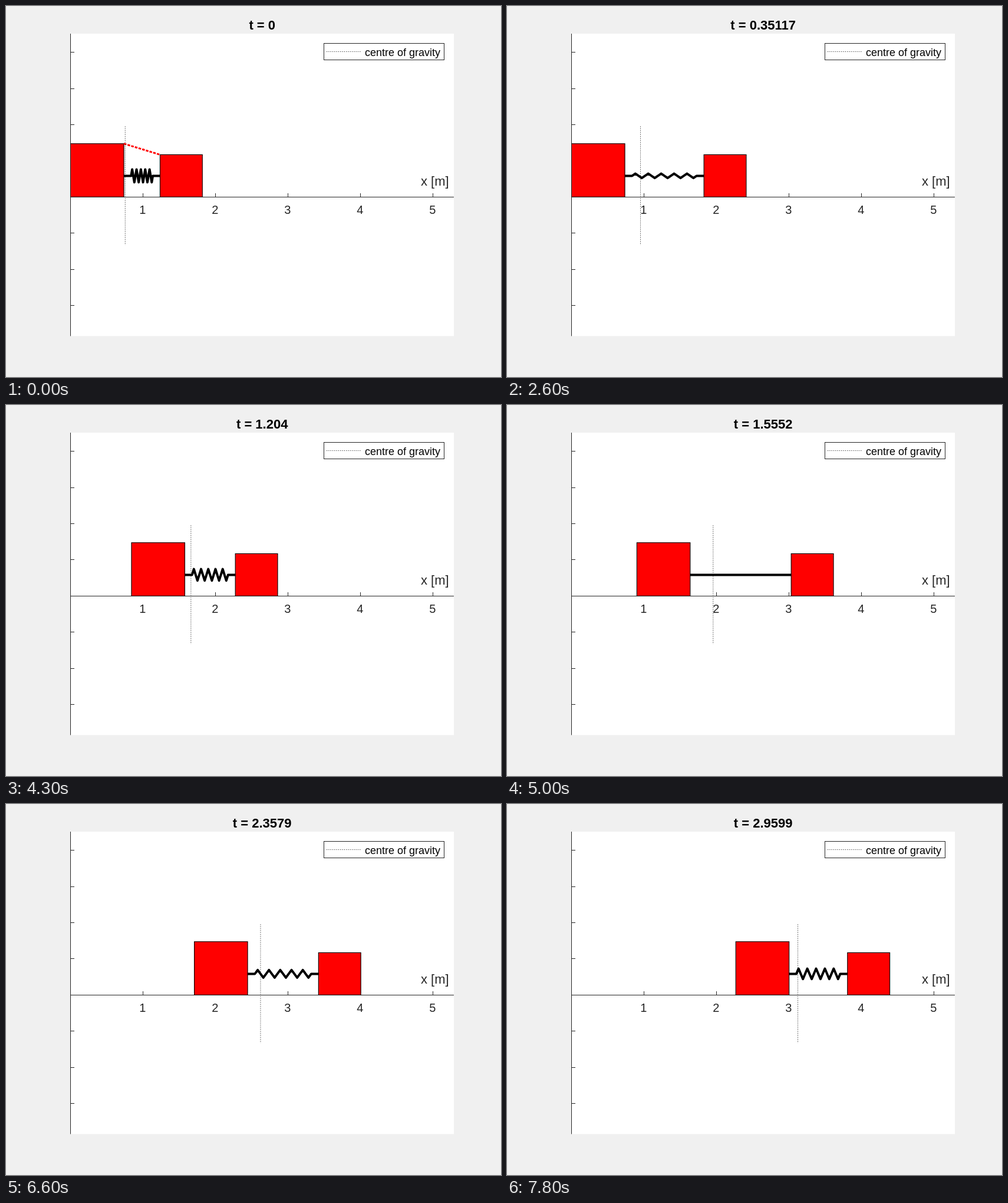
An HTML page for the animation above (7.9 s loop, 840 px wide and 630 px high).

```html
<!DOCTYPE html>
<html lang="en">
<head>
<meta charset="utf-8">
<title>Spring and two blocks</title>
<style>
  html, body { margin: 0; width: 100%; height: 100%; overflow: hidden; background: #f0f0f0; }
  svg { display: block; width: 840px; height: 630px; font-family: "Liberation Sans", Arial, sans-serif; }
  .axis { stroke: #262626; fill: none; }
  .label { fill: #262626; font-size: 20px; text-anchor: middle; }
  .dotted { stroke: #000; stroke-width: .8; stroke-dasharray: 1.3 2; fill: none; }
  .block { fill: #f00; stroke: #000; stroke-width: 1.1; }
</style>
</head>
<body>
<svg viewBox="0 0 840 630">
  <rect width="840" height="630" fill="#f0f0f0"/>
  <rect x="109" y="47" width="651" height="513.5" fill="#fff"/>
  <g id="axes"></g>
  <rect id="big" class="block"/>
  <rect id="small" class="block"/>
  <path id="rope" stroke="#f00" stroke-width="3" stroke-dasharray="4.5 2" fill="none"/>
  <path id="spring" stroke="#000" stroke-width="4" stroke-linejoin="round" fill="none"/>
  <path id="centre" class="dotted"/>
  <path class="axis" d="M109.5 47V560.5M109 324.5H760"/>
  <text x="704" y="305" font-size="22" fill="#262626">x [m]</text>
  <rect x="539.5" y="63.5" width="204" height="28" fill="#fff" stroke="#262626"/>
  <path class="dotted" d="M544 77.5H603"/>
  <text x="609" y="85" font-size="18">centre of gravity</text>
  <text id="title" x="434.7" y="40" font-size="22" font-weight="bold" text-anchor="middle"></text>
</svg>
<script>
const $ = id => document.getElementById(id);
const SCALE = 122.83, LEFT = 109.5, GROUND = 324.3;
const px = x => LEFT + SCALE * x;
const py = y => GROUND - SCALE * y;

// Physical setup: the heavy block starts against a wall, the spring is compressed.
const BIG = Math.cbrt(2 / 5), SMALL = Math.cbrt(1 / 5);
const REST = 1, SQUEEZE = 0.5, STIFFNESS = 25;
const OMEGA_WALL = Math.sqrt(STIFFNESS), OMEGA_FREE = Math.sqrt(STIFFNESS * 1.5);
const RELEASE = Math.PI / 2 / OMEGA_WALL, SPEED = SQUEEZE * OMEGA_WALL;
const COILS = 5, STUB = 0.1, SPRING_Y = SMALL / 2;
const WIRE = Math.hypot((REST - 2 * STUB) / (2 * COILS), 0.05);

const LOOP = 7900, HOLD = 2000, STEP = 100, DT = 15 / 299;

function drawAxes() {
  let ticks = "", labels = "";
  for (let i = 1; i <= 5; i++) {
    const x = Math.round(px(i)) + 0.5;
    ticks += `M${x} 324.5V318`;
    labels += `<text class="label" x="${x - 0.7}" y="353">${i}</text>`;
  }
  for (let i = -3; i <= 4; i++) ticks += `M109.5 ${Math.floor(py(i / 2)) + 0.5}H116`;
  $("axes").innerHTML = `<path class="axis" d="${ticks}"/>${labels}`;
}

// Left edge of the heavy block and length of the spring.
function motion(t) {
  if (t < RELEASE) return { left: 0, gap: REST - SQUEEZE * Math.cos(OMEGA_WALL * t) };
  const free = t - RELEASE;
  const stretch = SPEED / OMEGA_FREE * Math.sin(OMEGA_FREE * free);
  return { left: (SPEED * free - stretch) / 3, gap: REST + stretch };
}

function springPath(x, gap) {
  const coil = (gap - 2 * STUB) / COILS;
  const height = Math.sqrt(Math.max(0, WIRE ** 2 - (coil / 2) ** 2));
  const start = x + STUB;
  let d = `M${px(x)} ${py(SPRING_Y)}H${px(start)}`;
  for (let i = 0; i < 2 * COILS; i++) {
    const side = i % 2 ? -1 : 1;
    d += `L${px(start + coil * (i / 2 + 0.25))} ${py(SPRING_Y + side * height)}`;
  }
  return d + `L${px(x + gap - STUB)} ${py(SPRING_Y)}H${px(x + gap)}`;
}

function placeBlock(id, x, size) {
  const box = { x: px(x), y: py(size), width: SCALE * size, height: SCALE * size };
  for (const key in box) $(id).setAttribute(key, box[key]);
}

function render(ms) {
  const n = ms < HOLD ? 0 : Math.floor((ms - HOLD) / STEP) + 1;
  const t = n * DT;
  const { left, gap } = motion(t);
  const inner = left + BIG, outer = inner + gap;
  const centre = (2 * (left + BIG / 2) + outer + SMALL / 2) / 3;
  placeBlock("big", left, BIG);
  placeBlock("small", outer, SMALL);
  $("spring").setAttribute("d", springPath(inner, gap));
  $("centre").setAttribute("d", `M${px(centre)} 204.5V406`);
  $("rope").setAttribute("d", n ? "" : `M${px(inner)} ${py(BIG)}L${px(outer)} ${py(SMALL)}`);
  $("title").textContent = "t = " + Number(t.toPrecision(5));
}

drawAxes();
const begin = performance.now();
function tick() {
  render((performance.now() - begin) % LOOP);
  requestAnimationFrame(tick);
}
tick();
</script>
</body>
</html>
```
